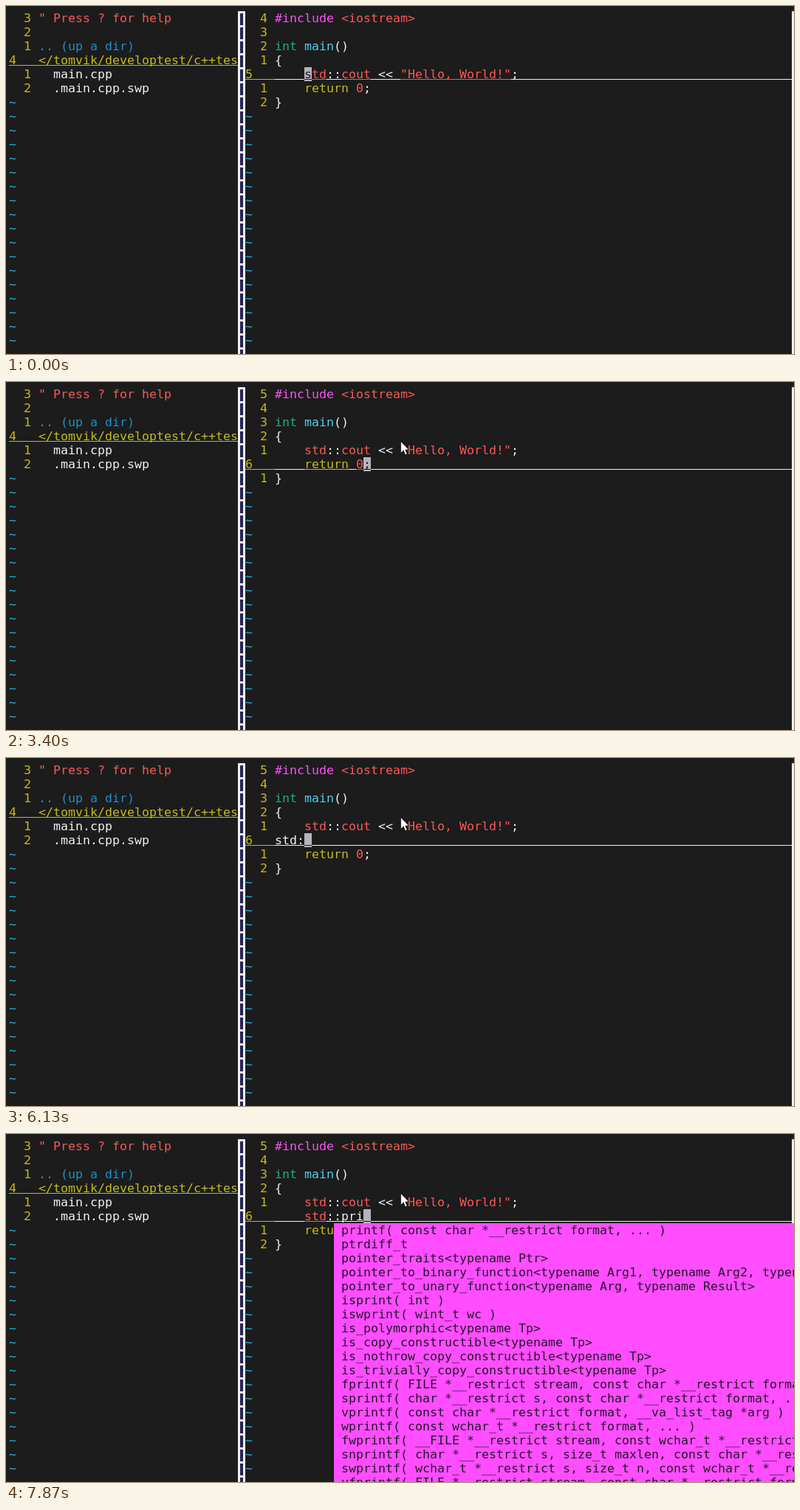
Write an HTML page that moves like this. It is 1067 px wide and 472 px high and loops after 8 s.

```html
<!DOCTYPE html>
<html lang="en">
<head>
<meta charset="utf-8">
<title>Vim completion</title>
<style>
  html, body { margin: 0; width: 100%; height: 100%; overflow: hidden; background: #1c1c1c; }
  #stage { position: relative; width: 1067px; height: 472px; overflow: hidden;
    font: 16.61px/19px "DejaVu Sans Mono", "Noto Sans Mono", monospace; font-variant-ligatures: none; }
  #stage span, #stage div, #mouse { position: absolute; }
  span { white-space: pre; height: 19px; }
  .w { color: #f0f0f0; } .y { color: #c2ba1a; } .r { color: #ff5555; }
  .m { color: #ff4dff; } .g { color: #1fae70; } .c { color: #4fcdf5; }
  .b { color: #1e90c4; } .t { color: #1eb4e6; }
  .k { color: #24182c; } .id { color: #6b1050; }
  .u { background: linear-gradient(currentColor, currentColor) 0 16px / 100% 1px no-repeat; }
  .sel { color: #1c1c1c; background: #eee; }
  .cur { color: #1c1c1c; background-color: #b4b4c0; min-width: 10px; }
  .menu { background: #ff4dff; }
  .split { left: 314px; top: 7px; width: 10px; height: 465px; background: #eee; }
  .split::after { content: ""; position: absolute; left: 3px; width: 4px; height: 100%;
    background: repeating-linear-gradient(#0000 0 3px, #24245a 3px 19px); }
  .edge { left: 1064px; top: 7px; width: 3px; height: 465px; background: #eee; }
  #mouse { left: 0; top: 0; overflow: visible; }
</style>
</head>
<body>
<div id="stage">
  <div id="tree"></div>
  <div class="split"></div>
  <div class="edge"></div>
  <div id="editor"></div>
  <svg id="mouse" width="13" height="21"><path d="M.5 .5V16.3L4.2 12.9L6.7 18.7L9.2 17.6L6.7 12H11.6Z" fill="#fff" stroke="#111" stroke-width=".8"/></svg>
</div>
<script>
const LOOP = 8000, TEXT = 36, RIGHT = 106;
const tree = document.getElementById('tree');
const editor = document.getElementById('editor');
const mouse = document.getElementById('mouse');

const CODE = [
  [['m', '#include '], ['r', '<iostream>']],
  [],
  [['g', 'int '], ['c', 'main'], ['w', '()']],
  [['w', '{']],
  [['w', '    '], ['r', 'std'], ['w', '::'], ['r', 'cout'], ['w', ' << '], ['r', '"Hello, World!"'], ['w', ';']],
  [['w', '    '], ['y', 'return'], ['w', ' '], ['r', '0'], ['w', ';']],
  [['w', '}']],
];

const words = s => s.split(' ');
const rows = s => s.trim().split('\n');

const O_WORDS = words('or oct open options ostream ofstream operator optional override ostrstream');
const S_WORDS = words('set sin std str setf setw sinh sort span sqrt');
const ST_WORDS = words('std str stod stof stoi stol stack static string is_trivially_copy_assignable');
const STD_WORDS = words('std stdin stdarg stddef stderr stdint stdlib stdout stddev is_nothrow_swap_destructible');

const STD_ALL = rows(`
abort()
abs( int x )
addressof( Tp &r )
add_const<typename Tp>
add_const_t<typename Tp>
add_cv<typename Tp>
add_cv_t<typename Tp>
add_lvalue_reference<typename Tp>
add_lvalue_reference_t<typename Tp>
add_pointer<typename Tp>
add_pointer_t<typename Tp>
add_rvalue_reference<typename Tp>
add_rvalue_reference_t<typename Tp>
add_volatile<typename Tp>
add_volatile_t<typename Tp>
advance( InputIterator &i, Distance n )
aligned_storage<std::size_t Len, std::size_t Align>
aligned_storage_t<size_t Len, size_t Align>
aligned_union<size_t Len, typename Types>`);

const STD_P = rows(`
pair<typename T1, typename T2>
perror( const char *s )
placeholders::
plus<typename Tp>
pointer_safety
pointer_traits<typename Ptr>
pointer_to_binary_function<typename Arg1, typename Arg2, typename Result>
pointer_to_unary_function<typename Arg, typename Result>
pop_heap( RandomAccessIterator first, RandomAccessIterator last )
pow( double x, double y )
prev( BidirectionalIterator x )
prev_permutation( BidirectionalIterator first, BidirectionalIterator last )
printf( const char *__restrict format, ... )
priority_queue<typename Tp>
promise<typename Res>
ptrdiff_t
ptr_fun( Result (*x)(Arg) )
push_heap( RandomAccessIterator first, RandomAccessIterator last )
putchar( int c )`);

const STD_PRI = rows(`
printf( const char *__restrict format, ... )
ptrdiff_t
pointer_traits<typename Ptr>
pointer_to_binary_function<typename Arg1, typename Arg2, typename Result>
pointer_to_unary_function<typename Arg, typename Result>
isprint( int )
iswprint( wint_t wc )
is_polymorphic<typename Tp>
is_copy_constructible<typename Tp>
is_nothrow_copy_constructible<typename Tp>
is_trivially_copy_constructible<typename Tp>
fprintf( FILE *__restrict stream, const char *__restrict format, ... )
sprintf( char *__restrict s, const char *__restrict format, ... )
vprintf( const char *__restrict format, __va_list_tag *arg )
wprintf( const wchar_t *__restrict format, ... )
fwprintf( __FILE *__restrict stream, const wchar_t *__restrict format, ... )
snprintf( char *__restrict s, size_t maxlen, const char *__restrict format, ... )
swprintf( wchar_t *__restrict s, size_t n, const wchar_t *__restrict format, ... )
vfprintf( FILE *__restrict stream, const char *__restrict format, ... )`);

const plain = s => [['w', '    ' + s]];
const scoped = s => [['w', '    '], ['r', 'std'], ['w', s]];

// at: ms, row/col: text cursor, line: the line being typed, ids/members: completion menu
const STEPS = [
  { at: 0, row: 4, col: 40 },
  { at: 1270, row: 3, col: 37, visual: true },
  { at: 2330, row: 4, col: 53, visual: true },
  { at: 3400, row: 5, col: 48 },
  { at: 3930, row: 4, col: 53 },
  { at: 4270, row: 5, col: 40, line: plain('') },
  { at: 4330, row: 5, col: 41, line: plain('o'), ids: O_WORDS },
  { at: 5070, row: 5, col: 40, line: plain('') },
  { at: 5530, row: 5, col: 41, line: plain('s'), ids: S_WORDS },
  { at: 5730, row: 5, col: 42, line: plain('st'), ids: S_WORDS },
  { at: 5800, row: 5, col: 42, line: plain('st'), ids: ST_WORDS },
  { at: 5930, row: 5, col: 43, line: scoped(''), ids: STD_WORDS },
  { at: 6130, row: 5, col: 40, line: [['w', 'std:']] },
  { at: 6330, row: 5, col: 45, line: scoped('::'), members: STD_ALL },
  { at: 6800, row: 5, col: 46, line: scoped('::p'), members: STD_P },
  { at: 7730, row: 5, col: 47, line: scoped('::pr'), members: STD_P },
  { at: 7800, row: 5, col: 48, line: scoped('::pri'), members: STD_P },
  { at: 7870, row: 5, col: 48, line: scoped('::pri'), members: STD_PRI },
];

function place(el, row, col) {
  el.style.left = 4 + col * 10 + 'px';
  el.style.top = 7 + row * 19 + 'px';
  return el;
}

function put(parent, row, col, text, cls) {
  const el = document.createElement('span');
  el.className = cls;
  el.textContent = text;
  parent.append(place(el, row, col));
  return col + text.length;
}

function tildes(parent, from, col) {
  for (let r = from; r < 24; r++) put(parent, r, col, '~', 't');
}

function drawTree() {
  [3, 2, 1, 0, 1, 2].forEach((n, r) => n && put(tree, r, 2, String(n), 'y'));
  put(tree, 0, 4, '" Press ? for help', 'r');
  put(tree, 2, 4, '.. (up a dir)', 'b');
  put(tree, 3, 0, '4   </tomvik/developtest/c++tes', 'y u');
  put(tree, 4, 6, 'main.cpp', 'w');
  put(tree, 5, 6, '.main.cpp.swp', 'w');
  tildes(tree, 6, 0);
}

function drawMenu({ ids, members }) {
  const list = ids || members;
  const col = ids ? 39 : 44;
  const longest = Math.max(...list.map(s => s.length));
  const box = document.createElement('div');
  box.className = 'menu';
  box.style.width = (ids ? Math.max(16, longest + 7) : 70) * 10 + 'px';
  box.style.height = list.length * 19 + 'px';
  editor.append(place(box, 6, col));
  list.forEach((s, i) => {
    put(editor, 6 + i, col + 1, s, 'k');
    if (ids) put(editor, 6 + i, col + longest + 2, '[ID]', 'id');
  });
}

function drawEditor(step) {
  const { row, col, visual, line } = step;
  const lines = line ? [...CODE.slice(0, 5), line, ...CODE.slice(5)] : CODE;
  const text = r => lines[r].map(p => p[1]).join('');
  const underline = visual ? '' : ' u';
  editor.replaceChildren();
  lines.forEach((parts, r) => {
    const under = r === row ? underline : '';
    if (r === row) put(editor, r, 32, String(r + 1).padEnd(4), 'y u');
    else put(editor, r, 34, String(Math.abs(r - row)), 'y');
    let x = TEXT;
    for (const [cls, s] of parts) x = put(editor, r, x, s, cls + under);
    if (under) put(editor, r, x, ' '.repeat(RIGHT - x), 'w u');
  });
  tildes(editor, lines.length, 32);
  if (visual) {
    put(editor, 3, TEXT, '{ ', 'sel');
    if (row > 3) put(editor, row, TEXT, text(row).slice(0, col - TEXT), 'sel');
  }
  put(editor, row, col, text(row)[col - TEXT] || ' ', 'cur' + underline);
  if (step.ids || step.members) drawMenu(step);
}

const curve = (a, b, c, p) => a * (1 - p) ** 2 + 2 * b * p * (1 - p) + c * p * p;

function moveMouse(t) {
  mouse.style.visibility = t < 470 ? 'hidden' : 'visible';
  const p = Math.min(12, Math.floor((t - 470) * 12 / 800 + 1e-6)) / 12;
  const x = curve(1056, 760, 534, p);
  const y = t < 1400 ? curve(466, -185, 78, p) : 80;
  mouse.style.transform = `translate(${Math.round(x)}px, ${Math.round(y)}px)`;
}

let shown = null;
const start = performance.now();

function tick() {
  const t = (performance.now() - start) % LOOP;
  const step = STEPS.findLast(s => s.at <= t);
  if (step !== shown) drawEditor(shown = step);
  moveMouse(t);
  requestAnimationFrame(tick);
}

drawTree();
tick();
</script>
</body>
</html>
```
